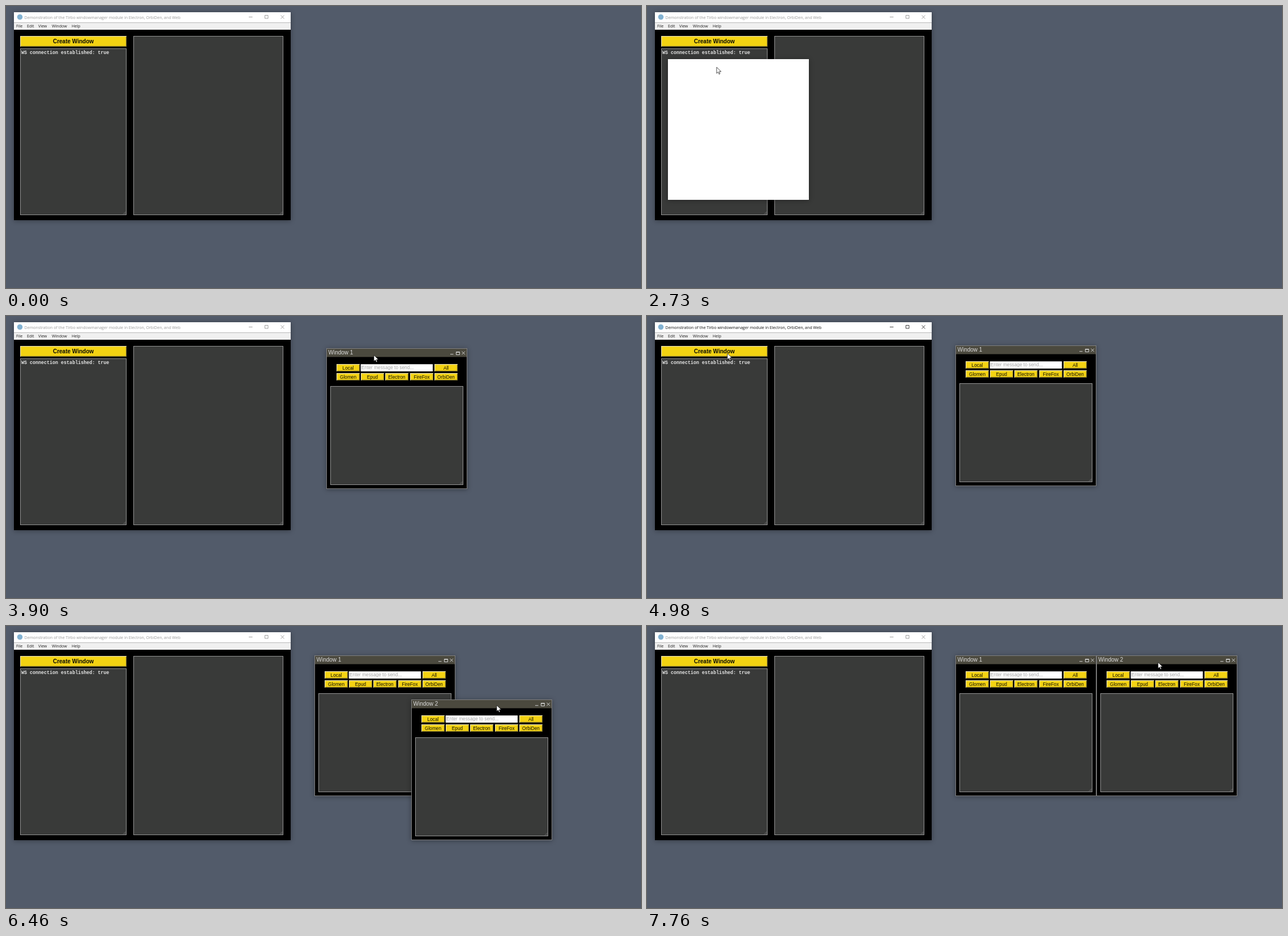
Write an HTML page that moves like this. It is 1122x499 px and loops after 8000 ms.

```html
<!DOCTYPE html>
<html lang="en">
<head>
<meta charset="utf-8">
<title>Window manager demo</title>
<style>
  html, body { margin: 0; width: 100%; height: 100%; overflow: hidden; background: #525b6a; }
  svg { display: block; }
  text { white-space: pre; }
  .ui { font: 7.1px "Open Sans", "Noto Sans", sans-serif; }
  .label { font: 8.3px "Liberation Sans", Arial, sans-serif; }
  .caption { font: 10px "Liberation Sans", Arial, sans-serif; }
  .strong { font-weight: bold; }
  .log { font: bold 8.35px "Liberation Mono", "Courier New", monospace; }
  .mid { text-anchor: middle; }
  .shadow { filter: drop-shadow(0 1px 4px rgba(0, 0, 0, .35)); }
</style>
</head>
<body>
<svg id="stage" width="1122" height="499" viewBox="0 0 1122 499"></svg>
<script>
const LOOP = 8000;
const TICK = 74; // ms between screen refreshes
const stage = document.getElementById('stage');

function add(parent, tag, attrs = {}, content) {
  const el = document.createElementNS('http://www.w3.org/2000/svg', tag);
  for (const key in attrs) el.setAttribute(key, attrs[key]);
  if (content) el.textContent = content;
  return parent.appendChild(el);
}

const rect = (p, x, y, width, height, fill, more) =>
  add(p, 'rect', { x, y, width, height, fill, ...more });
const line = (p, d, stroke, width = 1) =>
  add(p, 'path', { d, stroke, 'stroke-width': width, fill: 'none' });
const label = (p, x, y, content, cls, fill) =>
  add(p, 'text', { x, y, class: cls, fill }, content);
const show = (el, on) => el.setAttribute('visibility', on ? 'inherit' : 'hidden');

function textarea(p, x, y, w, h) {
  rect(p, x + .5, y + .5, w - 1, h - 1, '#393a39', { stroke: '#959595' });
  line(p, `M${x + w - 6} ${y + h - 1.5}l4.5 -4.5m-2 4.5l2 -2`, '#858585', .7);
}

function button(p, x, y, w, h, name, cls, base) {
  rect(p, x, y, w, h, '#f4d312');
  line(p, `M${x + .6} ${y + h}V${y + .6}H${x + w}`, '#e6dcae', 1.2);
  line(p, `M${x + w - .6} ${y + 1}V${y + h - .6}H${x + 1}`, '#85782c', 1.2);
  label(p, x + w / 2, y + base, name, cls + ' mid', '#0b0b05');
}

function mainWindow() {
  const g = add(stage, 'g');
  rect(g, 14, 11, 489, 368, '#000', { class: 'shadow' });
  rect(g, 14, 11, 489, 18.5, '#fff');
  rect(g, 14, 29.5, 489, 12.5, '#f0f0f0');
  add(g, 'circle', { cx: 24.5, cy: 19.5, r: 4.8, fill: '#82b2d2' });
  const title = label(g, 32.5, 22.5,
    'Demonstration of the Tirbo windowmanager module in Electron, OrbiDen, and Web', 'ui');
  const icons = line(g, 'M429 19.5h6.5M457.5 16.5h5.5v5.5h-5.5zM485.5 16.5l6 6m0 -6l-6 6', '#888', .8);
  const menu = { File: 18, Edit: 37, View: 57, Window: 81, Help: 116 };
  for (const name in menu) label(g, menu[name], 38, name, 'ui', '#222');
  button(g, 25, 53, 188, 19, 'Create Window', 'caption strong', 12.7);
  textarea(g, 25, 75, 188, 295);
  textarea(g, 225, 53, 265, 317);
  label(g, 27, 84.5, 'WS connection established: true', 'log', '#e4e4e4');
  return active => {
    title.setAttribute('fill', active ? '#111' : '#999');
    icons.setAttribute('stroke', active ? '#111' : '#888');
  };
}

function childWindow(name, { opened, loaded, titled, path }) {
  const g = add(stage, 'g');
  const blank = rect(g, 0, 0, 249, 249, '#fff', { class: 'shadow' });
  const body = add(g, 'g');
  rect(body, .5, .5, 248, 248, '#000', { stroke: '#808080' });
  rect(body, 1, 1, 247, 14.5, '#4b493e');
  const head = add(body, 'g');
  label(head, 3.5, 11.3, name, 'caption', '#dcdcdc');
  line(head, 'M219 10.7h5.5M229.5 6.5h6v5h-6zM229.5 7.2h6M239.5 5.7l5.5 5.5m0 -5.5l-5.5 5.5', '#d0d0d0');
  rect(body, 61, 28, 127, 13, '#fff');
  line(body, 'M61 40.5V28.5H188', '#b5b5b5');
  label(body, 62, 37.4, 'Enter message to send...', 'label', '#a3a3a3');
  const cell = (col, y, s) =>
    button(body, Math.round(18 + col * 43.2), y, 41, 13, s, 'label', 9.5);
  cell(0, 28, 'Local');
  cell(4, 28, 'All');
  ['Glomen', 'Epud', 'Electron', 'FireFox', 'OrbiDen'].forEach((s, i) => cell(i, 44, s));
  textarea(body, 7, 67, 235, 175);
  return t => {
    show(g, t >= opened);
    show(body, t >= loaded);
    show(head, t >= titled);
    blank.setAttribute('fill', t >= loaded ? '#000' : '#fff');
    place(g, path(t));
  };
}

const smooth = p => p * p * (3 - 2 * p);
const easeOut = p => 1 - (1 - p) ** 2;

// A start point, then legs of [begin, end, x, y, easing]
const route = (origin, ...legs) => t => {
  let [x, y] = origin;
  for (const [begin, end, toX, toY, ease = smooth] of legs) {
    if (t < begin) break;
    const held = Math.floor((t - begin) / TICK) * TICK;
    const k = t >= end ? 1 : ease(held / (end - begin));
    x += (toX - x) * k;
    y += (toY - y) * k;
  }
  return [x, y];
};

function place(el, point) {
  const [x, y] = point.map(Math.round);
  el.setAttribute('transform', `translate(${x} ${y})`);
}

const pointerPath = route([1076, 478],
  [650, 1720, 93.5, 67, easeOut],
  [2350, 2730, 123, 108],
  [3290, 3820, 657, 71], [3820, 4050, 629, 64],
  [4360, 4750, 141.5, 65.5],
  [5540, 5990, 142, 100],
  [6160, 6528, 947, 144], [6553, 7380, 907, 68, easeOut], [7620, 7760, 903, 64]);

const setActive = mainWindow();
const children = [
  childWindow('Window 1', {
    opened: 2420, loaded: 2890, titled: 2890,
    path: route([37, 94], [3290, 3820, 573, 59], [3820, 4050, 545, 52])
  }),
  childWindow('Window 2', {
    opened: 5220, loaded: 5380, titled: 5540,
    path: route([37, 94],
      [6160, 6553, 838, 136], [6553, 7380, 798, 56, easeOut], [7620, 7760, 794, 52])
  })
];
const pointer = add(stage, 'path', {
  d: 'M0 .3V11.2L2.6 8.8L4.3 12.7L6 12L4.4 8.1H8Z',
  fill: '#fff', stroke: '#000', 'stroke-width': .7
});

function draw(t) {
  setActive((t >= 2030 && t < 2420) || (t >= 4980 && t < 5220));
  children.forEach(update => update(t));
  show(pointer, t >= 650);
  place(pointer, pointerPath(t));
}

const start = performance.now();
function tick() {
  draw((performance.now() - start) % LOOP);
  requestAnimationFrame(tick);
}
tick();
</script>
</body>
</html>
```
